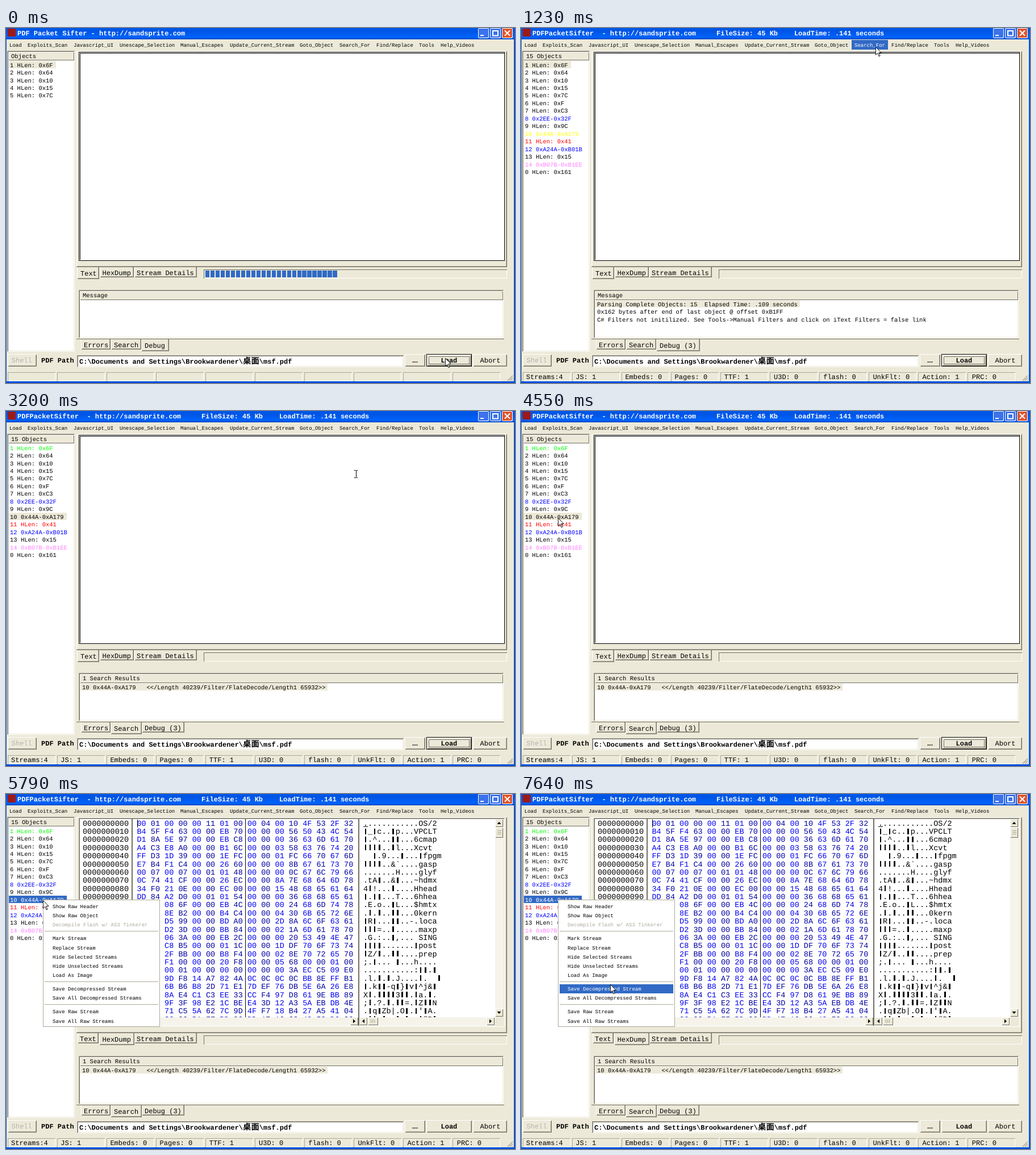
An HTML page that plays this animation: 896x625 px, repeating every 8000 ms.

```html
<!DOCTYPE html>
<html lang="en">
<head>
<meta charset="utf-8">
<title>PDF Packet Sifter</title>
<style>
html, body { margin: 0; width: 100%; height: 100%; overflow: hidden; background: #ece9d8; }
svg { display: block; width: 100%; height: 100%; }
text { font-family: "Liberation Mono", "Courier New", monospace; white-space: pre; text-rendering: geometricPrecision; }
.cjk { font-family: "Noto Sans CJK SC", "Noto Sans CJK", sans-serif; }
.sans { font-family: "Liberation Sans", Arial, sans-serif; }
rect, .edge { shape-rendering: crispEdges; }
</style>
</head>
<body>
<svg id="stage" viewBox="0 0 896 625" xmlns="http://www.w3.org/2000/svg"></svg>
<script>
const LOOP = 8000;
const FACE = '#ece9d8', DARK = '#716f64', SOFT = '#aca899', BLUE = '#316ac5', WHITE = '#fff', BLACK = '#000';

// Start time, pointer shape, pointer position, highlighted menu item
const steps = [
  [0, 'arrow', 773, 581], [120, 'arrow', 773, 581],
  [370, 'arrow', 655, 432], [490, 'beam', 575, 331],
  [740, 'beam', 590, 262], [860, 'beam', 620, 136], [980, 'beam', 634, 56],
  [1230, 'arrow', 624, 33], [1350, 'arrow', 619, 31], [1470, 'arrow', 616, 30], [1720, 'arrow', 616, 30],
  [2470, 'arrow', 614, 56, 1], [2590, 'arrow', 615, 80, 2], [2710, 'arrow', 615, 98, 3], [2830, 'arrow', 616, 111, 4],
  [3200, 'beam', 616, 111],
  [3820, 'beam', 430, 128], [3940, 'arrow', 122, 178], [4060, 'none', 0, 0],
  [4310, 'arrow', 59, 195], [4430, 'arrow', 62, 191], [4550, 'arrow', 65, 188],
  [4800, 'arrow', 65, 187], [4920, 'arrow', 65, 187], [5790, 'arrow', 65, 187],
  [7160, 'arrow', 65, 187], [7280, 'arrow', 84, 212, 1], [7400, 'arrow', 111, 262, 5],
  [7520, 'arrow', 139, 311, 8], [7640, 'arrow', 157, 335, 10]
];

const menuBar = [['Load', 6], ['Exploits_Scan', 38], ['Javascript_UI', 119], ['Unescape_Selection', 200],
  ['Manual_Escapes', 307], ['Update_Current_Stream', 394], ['Goto_Object', 517], ['Search_For', 587],
  ['Find/Replace', 652], ['Tools', 727], ['Help_Videos', 765]];
const searchMenu = ['Search Strings', 'Javascript', 'Flash Objects', 'U3D Objects', 'TTF Fonts', 'Action Tags',
  'Obsfuscated Headers', 'PRC Files', 'XML Streams', 'Filter Chains', 'Extract URLs'];
const streamMenu = ['Show Raw Header', 'Show Raw Object', 'Decompile Flash w/ AS3 Tinkerer', '-',
  'Mark Stream', 'Replace Stream', 'Hide Selected Streams', 'Hide Unselected Streams', 'Load As Image', '-',
  'Save Decompressed Stream', 'Save All Decompressed Streams', '-', 'Save Raw Stream', 'Save All Raw Streams'];
const objects = ['1 HLen: 0x6F', '2 HLen: 0x64', '3 HLen: 0x10', '4 HLen: 0x15', '5 HLen: 0x7C', '6 HLen: 0xF',
  '7 HLen: 0xC3', '8 0x2EE-0x32F', '9 HLen: 0x9C', '10 0x44A-0xA179', '11 HLen: 0x41', '12 0xA24A-0xB01B',
  '13 HLen: 0x15', '14 0xB07B-0xB1EE', '0 HLen: 0x161'];
const rowColors = { 7: '#00f', 9: '#ff0', 10: '#f00', 11: '#00f', 13: '#ff80ff' };
const counts = ['Streams:4', 'JS: 1', 'Embeds: 0', 'Pages: 0', 'TTF: 1', 'U3D: 0', 'flash: 0', 'UnkFlt: 0', 'Action: 1', 'PRC: 0'];
const messages = ['Parsing Complete Objects: 15  Elapsed Time: .109 seconds',
  '0x162 bytes after end of last object @ offset 0xB1FF',
  'C# Filters not initilized. See Tools->Manual Filters and click on iText Filters = false link'];
const result = '10 0x44A-0xA179   <</Length 40239/Filter/FlateDecode/Length1 65932>>';
const dump = `00 01 00 00 00 11 01 00 00 04 00 10 4F 53 2F 32
B4 5F F4 63 00 00 EB 70 00 00 00 56 50 43 4C 54
D1 8A 5E 97 00 00 EB C8 00 00 00 36 63 6D 61 70
A4 C3 E8 A0 00 00 B1 6C 00 00 03 58 63 76 74 20
FF D3 1D 39 00 00 1E FC 00 00 01 FC 66 70 67 6D
E7 B4 F1 C4 00 00 26 60 00 00 00 8B 67 61 73 70
00 07 00 07 00 01 01 48 00 00 00 0C 67 6C 79 66
0C 74 41 CF 00 00 26 EC 00 00 8A 7E 68 64 6D 78
34 F0 21 0E 00 00 EC 00 00 00 15 48 68 65 61 64
DD 84 A2 D0 00 01 01 54 00 00 00 36 68 68 65 61
10 45 08 6F 00 00 EB 4C 00 00 00 24 68 6D 74 78
09 C6 8E B2 00 00 B4 C4 00 00 04 30 6B 65 72 6E
DC 52 D5 99 00 00 BD A0 00 00 2D 8A 6C 6F 63 61
F3 CB D2 3D 00 00 BB 84 00 00 02 1A 6D 61 78 70
05 47 06 3A 00 00 EB 2C 00 00 00 20 53 49 4E 47
D9 BC C8 B5 00 00 01 1C 00 00 1D DF 70 6F 73 74
B4 5A 2F BB 00 00 B8 F4 00 00 02 8E 70 72 65 70
3B 07 F1 00 00 00 20 F8 00 00 05 68 00 00 01 00
01 0E 00 01 00 00 00 00 00 00 00 3A EC C5 09 E0
86 6C 9D F8 14 A7 82 4A 0C 0C 0C 0C BB 8E FF B1
E0 11 6B B6 B8 2D 71 E1 7D EF 76 DB 5E 6A 26 E8
58 DD 8A E4 C1 C3 EE 33 CC F4 97 D8 61 9E BB 89
3B D3 9F 3F 98 E2 1C BE E4 3D 12 A3 5A EB DB 4E
01 B6 71 C5 5A 62 7C 9D 4F F7 18 B4 27 A5 41 04
2D DD C6 00 B1 FF BD 9C DD 17 1C C0 40 50 D6 8C`.split('\n').map(row => row.split(' '));

const escape = s => s.replace(/&/g, '&amp;').replace(/</g, '&lt;').replace(/>/g, '&gt;');
const rect = (x, y, w, h, fill, more = '') => `<rect x="${x}" y="${y}" width="${w}" height="${h}" fill="${fill}" ${more}/>`;
const path = (d, stroke, more = '') => `<path d="${d}" fill="none" stroke="${stroke}" ${more}/>`;
const line = (d, stroke) => path(d, stroke, 'class="edge"');
// y is the middle of the capitals
const text = (s, x, y, size, fill = BLACK, more = '') =>
  `<text x="${x}" y="${(y + size * 0.33).toFixed(2)}" font-size="${size}" fill="${fill}" ${more}>${escape(s)}</text>`;
const BOLD = 'font-weight="bold"';

function bevel(x, y, w, h, light, dark, fill = 'none') {
  const l = x + .5, t = y + .5, r = x + w - .5, b = y + h - .5;
  return rect(x, y, w, h, fill) + line(`M${l} ${b}V${t}H${r}`, light) + line(`M${r} ${t}V${b}H${l}`, dark);
}
const raised = (x, y, w, h, fill = FACE) => bevel(x, y, w, h, WHITE, DARK, fill);
const sunken = (x, y, w, h, fill = FACE) => bevel(x, y, w, h, DARK, WHITE, fill);
const button = (x, y, w, h) => raised(x, y, w, h) + bevel(x + 1, y + 1, w - 2, h - 2, FACE, SOFT);
const well = (x, y, w, h) => bevel(x, y, w, h, SOFT, WHITE, WHITE) + bevel(x + 1, y + 1, w - 2, h - 2, DARK, FACE);

function titleBar(loaded) {
  const title = loaded
    ? 'PDFPacketSifter  - http://sandsprite.com     FileSize: 45 Kb    LoadTime: .141 seconds'
    : 'PDF Packet Sifter - http://sandsprite.com';
  const control = (x, fill, icon) =>
    `<rect x="${x + .5}" y=".5" width="18" height="17" rx="2.5" fill="${fill}" stroke="#fff"/>` + path(icon, WHITE, 'stroke-width="2"');
  return rect(0, 0, 896, 20, 'url(#bar)') + rect(3, 1, 14, 14, '#9c1a1a') +
    text(title, 20, 9, 12, WHITE, BOLD) +
    control(831, '#3c72ea', 'M835 13H841') +
    control(852, '#3c72ea', 'M856.5 5H866.5M857 4V13.5H866V4') +
    control(873, '#e0552f', 'M878 4.5L887 13.5M887 4.5L878 13.5');
}

function objectList(s) {
  let out = well(2, 40, 119, 530) + raised(4, 42, 116, 15) +
    text(s.loaded ? '15 Objects' : 'Objects', 9, 49.5, 10.5);
  const selected = s.found ? 9 : 0;
  objects.slice(0, s.loaded ? 15 : 5).forEach((label, i) => {
    const y = 65.2 + i * 13.45;
    let fill = rowColors[i] || BLACK;
    if (i === 0 && s.found) fill = '#0f0';
    if (i === selected) {
      out += rect(5, Math.floor(y - 6.6), Math.round(label.length * 6.3 + 7), 13, s.picked ? BLUE : FACE);
      fill = s.picked ? WHITE : BLACK;
    }
    out += text(label, 7, y, 10.5, fill);
  });
  return out;
}

function tab(label, x, top, right, active, tx) {
  const l = active ? x - 1 : x, r = active ? right + 1 : right;
  const b = top + (active ? 21 : 18);
  return rect(l, top, r - l, b - top, FACE) +
    line(`M${l + .5} ${top}V${b - .5}`, WHITE) +
    line(`M${l + 2} ${b - 1.5}H${r - 1.5}V${top}`, SOFT) +
    line(`M${l + 1} ${b - .5}H${r - .5}V${top}`, DARK) +
    text(label, tx, top + (active ? 11.5 : 9.7), 12);
}

function scrollButton(x, y, dir) {
  const cx = x + 7, cy = y + 7;
  const tip = { u: 'l-3.5 4h7z', d: 'l-3.5 -4h7z', l: 'l4 -3.5v7z', r: 'l-4 -3.5v7z' }[dir];
  const dx = { l: -2, r: 2 }[dir] || 0, dy = { u: -2, d: 2 }[dir] || 0;
  return raised(x, y, 14, 14) + `<path d="M${cx + dx} ${cy + dy}${tip}"/>`;
}

// Control codes become dots, 0xFF a wide blank, other high bytes a gap for a bar
function glyph(code) {
  if (code === 255) return '  ';
  if (code >= 160) return '\u00a0';
  return code < 32 || code > 126 ? '.' : String.fromCharCode(code);
}

function hexView() {
  let names = '', bytes = '', chars = '';
  const pitch = 14.37, cell = 8.1;
  dump.forEach((row, i) => {
    const y = 51.3 + i * pitch;
    names += text((i * 16).toString(16).toUpperCase().padStart(10, '0'), 135, y, 13.5);
    [0, 1].forEach(odd => {
      const half = row.filter((_, k) => k % 2 === odd).join('    ');
      bytes += text(half, 230.5 + odd * 3 * cell, y, 13.5, odd ? '#0000a0' : '#0000f0');
    });
    const ascii = row.map(b => glyph(parseInt(b, 16))).join('');
    chars += text(ascii, 629, y, 13.5);
    [...ascii].forEach((c, k) => {
      if (c === '\u00a0') chars += rect((631.5 + k * cell).toFixed(1), (y - 5).toFixed(1), 2.7, 10, BLACK);
    });
  });
  names += text('0000000190', 135, 51.3 + 25 * pitch, 13.5);
  const track = '#f5f3ea';
  const grip = (x, y, d) => [0, 3, 6].map(k => line(d === 'h' ? `M${x + k} ${y}v6` : `M${x} ${y + k}h7`, SOFT)).join('');
  return well(128, 42, 750, 368) +
    `<g clip-path="url(#names)">${names}</g><g clip-path="url(#bytes)">${bytes}${chars}</g>` +
    rect(221, 44, 2, 364, DARK) + rect(421, 44, 1, 349, BLACK) + rect(620, 44, 2, 364, DARK) +
    rect(231, 45, 1, 14, BLACK) + rect(629, 57, 8, 1, BLACK) +
    rect(861, 44, 15, 349, track) + scrollButton(861, 44, 'u') + raised(861, 59, 14, 18) + grip(864.5, 64.5, 'v') + scrollButton(861, 378, 'd') +
    rect(223, 393, 397, 14, track) + scrollButton(223, 393, 'l') + raised(238, 393, 24, 14) + grip(246.5, 397, 'h') + scrollButton(606, 393, 'r') +
    rect(622, 393, 239, 14, track) + scrollButton(622, 393, 'l') + raised(637, 393, 18, 14) + grip(642.5, 397, 'h') + scrollButton(846, 393, 'r') +
    rect(861, 393, 15, 15, FACE);
}

function mainPane(s) {
  let out = line('M124.5 420V41.5H881', WHITE) + line('M880.5 42V419.5H125', SOFT) + line('M881.5 41V420.5H124', DARK);
  if (s.hex) out += hexView();
  else out += rect(128, 42, 750, 368, WHITE) + line('M128.5 42.5H877.5V409.5H128.5Z', BLACK) + line('M130.5 408V44.5H877', BLACK);
  out += tab('Text', 126, 421, 163, !s.hex, s.hex ? 130 : 131) +
    tab('Stream Details', 226, 421, 336, false, 230) +
    tab('HexDump', 165, 421, 225, s.hex, 169.5) +
    sunken(348, 425, 534, 16);
  if (!s.loaded) for (let i = 0; i < 26; i++) out += rect((351 + i * 8.97).toFixed(1), 427, 7.4, 12, BLUE);
  return out;
}

function messagePane(s) {
  let out = well(128, 461, 748, 85) + raised(130, 463, 745, 16) +
    text(s.found ? '1 Search Results' : 'Message', 135, 471, 10.5) + line('M124 547.5H877', DARK);
  const rows = s.found ? [result] : s.loaded ? messages : [];
  rows.forEach((row, i) => {
    if (i === 0) out += rect(131, 480, Math.round(row.length * 6.3 + 7), 12, FACE);
    out += text(row, 134, 486.5 + i * 13.5, 10.5);
  });
  const debug = s.loaded ? 'Debug (3)' : 'Debug';
  return out + tab('Errors', 132, 548, 184, false, 137) +
    tab(debug, 239, 548, s.loaded ? 314 : 286, !s.found, 244) +
    tab('Search', 185, 548, 238, s.found, 190);
}

function footer(s) {
  let out = button(3, 574, 51, 22) + text('Shell', 11, 585.7, 12, WHITE) + text('Shell', 10, 584.7, 12, SOFT) +
    text('PDF Path', 62, 585.5, 12, BLACK, BOLD) + well(125, 576, 575, 21) +
    text('C:\\Documents and Settings\\Brookwardener\\', 129, 587, 12, BLACK, BOLD) +
    text('桌面', 417, 586.6, 14.4, BLACK, 'class="cjk" ' + BOLD) +
    text('\\msf.pdf', 445.8, 587, 12, BLACK, BOLD) +
    button(702, 574, 36, 22) + text('...', 715, 585, 12, BLACK, 'class="sans" ' + BOLD);
  if (s.picked) out += button(740, 574, 80, 22);
  else out += rect(740, 574, 80, 22, BLACK) + button(741, 575, 78, 20) +
    path('M744.5 578.5H815.5V591.5H744.5Z', BLACK, 'stroke-dasharray="1 1" class="edge"');
  out += text('Load', 765.5, 585, 12, BLACK, BOLD) + button(822, 574, 60, 22) + text('Abort', 834.5, 585, 12);
  counts.forEach((label, i) => {
    out += bevel(3 + i * 87, 606, 84, 16, SOFT, WHITE);
    if (s.loaded) out += text(label, 9 + i * 87.2, 614.5, 12);
  });
  return out + path('M883 621L892 612M887 621L892 616M891 621L892 620', SOFT, 'stroke-width="1.5"');
}

function popup(x, y, w, h, items, tx, first, active, off) {
  let out = rect(x + .5, y + .5, w - 1, h - 1, WHITE, `stroke="${SOFT}"`), cy = first;
  items.forEach((label, i) => {
    if (label === '-') {
      out += rect(x + 3, Math.round(cy - 5), w - 6, 1, SOFT);
      cy += 8;
      return;
    }
    if (i === active) out += rect(x + 3, Math.round(cy - 8.3), w - 6, 16, BLUE);
    out += text(label, tx, cy, 9, i === active ? WHITE : i === off ? SOFT : BLACK);
    cy += 16.15;
  });
  return out;
}

function pointer(kind, x, y) {
  if (kind === 'arrow') return `<path transform="translate(${x} ${y}) scale(.9)" d="M.5 .5V16L4.2 12.6 6.7 18.8 9 17.8 6.4 11.7H11.2Z" fill="#fff" stroke="#000"/>`;
  if (kind === 'beam') return line(`M${x - 3} ${y - 6.5}h2.5m1 0h2.5M${x - 3} ${y + 6.5}h2.5m1 0h2.5M${x} ${y - 6}v12`, BLACK);
  return '';
}

const defs = `<defs><linearGradient id="bar" x2="0" y2="1"><stop stop-color="#0058e8"/><stop offset=".3" stop-color="#0055e5"/>
<stop offset=".8" stop-color="#0064fb"/><stop offset="1" stop-color="#0048c8"/></linearGradient>
<clipPath id="names"><rect x="129" y="44" width="92" height="364"/></clipPath>
<clipPath id="bytes"><rect x="223" y="44" width="638" height="349"/></clipPath></defs>`;

function scene([t, kind, x, y, active]) {
  const s = { loaded: t >= 120, found: t >= 3200, picked: t >= 4800, hex: t >= 4920 };
  const hot = t >= 1230 && t < 3200;
  let out = defs + rect(0, 0, 896, 625, FACE) + titleBar(s.loaded);
  if (hot) out += rect(582, 21, 64, 17, BLUE);
  menuBar.forEach(([label, mx]) => { out += text(label, mx, 30, 9, hot && label === 'Search_For' ? WHITE : BLACK); });
  out += objectList(s) + mainPane(s) + messagePane(s) + footer(s) +
    rect(0, 20, 1, 605, '#0050dc') + rect(894, 20, 2, 605, '#0050dc') + rect(0, 622, 896, 3, '#0050dc');
  if (t >= 1720 && t < 3200) out += popup(582, 38, 147, 183, searchMenu, 599.5, 48.6, active);
  if (t >= 5790) out += popup(65, 186, 206, 224, streamMenu, 82, 198, active, 2);
  return out + pointer(kind, x, y);
}

const stage = document.getElementById('stage');
const start = performance.now();
let shown = null;

function frame() {
  const t = (performance.now() - start) % LOOP;
  const step = steps.filter(s => s[0] <= t).pop();
  if (step !== shown) {
    stage.innerHTML = scene(step);
    shown = step;
  }
  requestAnimationFrame(frame);
}
frame();
</script>
</body>
</html>
```
